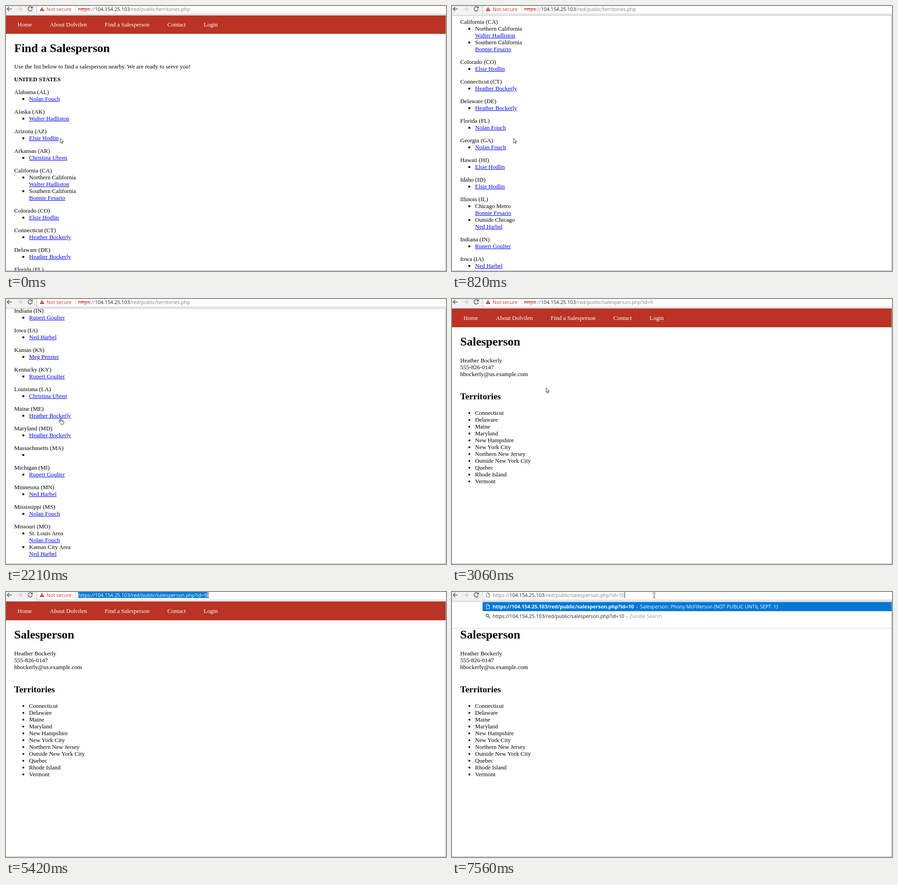
Animation of 964x581 px, one loop 8000 ms. Source, as an HTML page:

```html
<!DOCTYPE html>
<html lang="en">
<head>
<meta charset="utf-8">
<title>Find a Salesperson</title>
<style>
html, body { margin: 0; width: 100%; height: 100%; overflow: hidden; background: #fff; }
body { position: relative; font: 13px/15px "Liberation Serif", serif; color: #000; }
#view { position: absolute; left: 0; top: 21px; width: 963px; height: 559px; overflow: hidden; }
.page { position: absolute; left: 0; top: 0; width: 963px; }
nav { height: 15px; padding: 13px 0 13px 25.3px; background: #ba3324; color: #fff; white-space: nowrap; }
nav span { margin-right: 39px; }
main { padding-left: 18px; }
h1 { font-size: 26px; line-height: 30px; margin: 17.4px 0; }
h2 { font-size: 19.5px; line-height: 22.4px; margin: 16.2px 0; }
p { margin: 0 0 13px; }
ul { margin: 0 0 13px; padding-left: 32.5px; }
.squares ul { list-style: square; }
u { color: #00e; }
svg { position: absolute; left: 0; top: 0; width: 964px; height: 581px; }
svg text { font: 10.8px "Open Sans", sans-serif; white-space: pre; }
svg .b { font-weight: 700; font-size: 11px; }
svg .s { text-decoration: line-through; }
</style>
</head>
<body>
<div id="view"><div class="page squares" id="list"></div><div class="page" id="person"></div></div>
<svg id="chrome"></svg>
<svg id="pointer"></svg>
<script>
const $ = id => document.getElementById(id);

// ---- web pages
const people = {
  N: 'Nolan Fouch', W: 'Walter Hadliston', E: 'Elsie Hodlin', C: 'Christina Ubren', B: 'Bonnie Fesario',
  H: 'Heather Bockerly', D: 'Ned Harbel', R: 'Rupert Goulter', M: 'Meg Penster'
};
const states = `Alabama (AL)=N|Alaska (AK)=W|Arizona (AZ)=E|Arkansas (AR)=C
California (CA)=Northern California:W,Southern California:B|Colorado (CO)=E|Connecticut (CT)=H
Delaware (DE)=H|Florida (FL)=N|Georgia (GA)=N|Hawaii (HI)=E|Idaho (ID)=E
Illinois (IL)=Chicago Metro:B,Outside Chicago:D|Indiana (IN)=R|Iowa (IA)=D|Kansas (KS)=M
Kentucky (KY)=R|Louisiana (LA)=C|Maine (ME)=H|Maryland (MD)=H|Massachusetts (MA)=
Michigan (MI)=R|Minnesota (MN)=D|Mississippi (MS)=N
Missouri (MO)=St. Louis Area:N,Kansas City Area:D`.split(/[|\n]/);

const nav = '<nav>' + ['Home', 'About Dolvilen', 'Find a Salesperson', 'Contact', 'Login']
  .map(s => `<span>${s}</span>`).join('') + '</nav>';

function territory(entry) {
  const [area, key] = entry.includes(':') ? entry.split(':') : ['', entry];
  const link = key ? `<u>${people[key]}</u>` : '&nbsp;';
  return `<li>${area ? area + '<br>' : ''}${link}</li>`;
}

$('list').innerHTML = nav + `<main><h1>Find a Salesperson</h1>
  <p>Use the list below to find a salesperson nearby. We are ready to serve you!</p>
  <p><b>UNITED STATES</b></p>` + states.map(line => {
    const [state, areas] = line.split('=');
    return `<div>${state}<ul>${areas.split(',').map(territory).join('')}</ul></div>`;
  }).join('') + '</main>';

$('person').innerHTML = nav + `<main><h1>Salesperson</h1>
  <div>${people.H}<br>555-826-0147<br>hbockerly@us.example.com<br>&nbsp;</div>
  <h2>Territories</h2><ul>` + ['Connecticut', 'Delaware', 'Maine', 'Maryland', 'New Hampshire', 'New York City',
    'Northern New Jersey', 'Outside New York City', 'Quebec', 'Rhode Island', 'Vermont']
  .map(s => `<li>${s}</li>`).join('') + '</ul></main>';

// ---- browser frame
const HOST = '104.154.25.103', PERSON = '/red/public/salesperson.php?id=', FULL = 'https://' + HOST + PERSON;
const BLUE = '#0078d7', GREY = '#808080', DARK = '#222', RED = '#c53929', LINK = '#1f55c8';

const rect = (x, y, w, h, fill) => `<rect x="${x}" y="${y}" width="${w}" height="${h}" fill="${fill}"/>`;
const path = (d, stroke, width = 1, fill = 'none') =>
  `<path d="${d}" stroke="${stroke}" stroke-width="${width}" fill="${fill}"/>`;
const span = (s, fill, cls = '') => `<tspan fill="${fill}" class="${cls}">${s}</tspan>`;
const text = (x, y, s, fill = DARK, cls = '') => `<text x="${x}" y="${y}" fill="${fill}" class="${cls}">${s}</text>`;
const docIcon = (y, c) => path(`M75.5 ${y - 4.5}h4l2.5 2.5v6.5h-6.5zM79.5 ${y - 4.5}v2.5h2.5`, c);
const lens = y => `<circle cx="77.5" cy="${y - 1}" r="3" fill="none" stroke="#555" stroke-width="1.3"/>` +
  path(`M79.7 ${y + 1.2}l3.6 3.6`, '#555', 1.6);

function bar(loading) {
  return rect(0, 0, 964, 20, '#f2f2f2') + rect(67, 0, 897, 17, '#fff') +
    rect(67, 0, 1, 17, '#b8b8b8') + rect(67, 17, 897, 1, '#c6c6c6') + rect(0, 20, 964, 1, '#b8b8b8') +
    rect(963, 21, 1, 560, '#b0b0b0') + rect(0, 580, 964, 1, '#b0b0b0') +
    path('M12.5 6.5H2.5M7 2L2.5 6.5L7 11', '#555', 1.5) + path('M25 6.5H35M30.5 2L35 6.5L30.5 11', '#ccc', 1.5) +
    (loading ? path('M49 2l8.5 8.5M57.5 2L49 10.5', '#555', 1.6)
      : path('M56.6 3.2A4.7 4.7 0 1 0 57.6 7.5', '#555', 1.5) + path('M58.5 .5V5.2H53.8z', 'none', 0, '#555'));
}

function secureUrl(tail, selected) {
  const c = fill => selected ? '#fff' : fill;
  return path('M79 2L84.2 11H73.8z', 'none', 0, RED) + rect(78.5, 5, 1, 3, '#fff') + rect(78.5, 9, 1, 1, '#fff') +
    text(89, 10.5, 'Not secure', RED) + rect(152, 0, 1, 13, '#ccc') +
    (selected ? rect(158, 0, 283, 13, BLUE) : '') +
    text(158, 10.5, span('https', c(RED), selected ? '' : 's') + span('://', c(GREY)) + span(HOST, c(DARK)) + span(tail, c(GREY)));
}

const editUrl = (id, done) => docIcon(6.5, '#666') + (done ? '' : rect(371.5, 0, 6.5, 13, BLUE)) +
  text(89, 10.5, span('https://', GREY) + span(HOST, DARK) + span(PERSON + id, GREY) + (done ? '' : span('0', '#fff')));

const panel = bottom => rect(0, 21, 963, bottom - 21, '#fff') + rect(0, bottom, 963, 1, '#dcdcdc') +
  rect(0, bottom + 1, 963, 1, '#f3f3f3');
const caret = x => rect(x, 0, 1, 13, '#333');
const hidden = 'Salesperson: Phony McFillerson (NOT PUBLIC UNTIL SEPT. 1)';

function suggestion(y, id, x, title) {
  return docIcon(y, '#666') + text(89, y + 4, FULL, LINK, 'b') + text(386.5, y + 4, id, '#4a78d6') +
    text(x - 8, y + 4, '-', GREY) + text(x, y + 4, title);
}
const search = (y, id, x) => lens(y) + text(89, y + 4, FULL + id) + text(x - 8, y + 4, '-', GREY) +
  text(x, y + 4, 'Zundle Search', '#999');

const allMatches = () => panel(129) + rect(67, 23, 896, 20, BLUE) + docIcon(33, '#fff') +
  text(89, 37, FULL, '#fff', 'b') + suggestion(53, '10', 411, hidden) + search(73, '', 377) +
  suggestion(93.5, '9', 404.5, 'Salesperson: ' + people.H) + suggestion(114, '4', 404.5, 'Salesperson: ' + people.W);

const oneMatch = id => panel(79) + rect(67, 22, 896, 20, BLUE) + docIcon(32, '#fff') +
  text(89, 36, FULL + '10', '#fff', 'b') + text(404, 36, '-', '#fff') + text(412, 36, hidden, '#fff') +
  search(52.5, id, id === '10' ? 389 : 383);

function frame(t) {
  const base = bar(t >= 2510 && t < 2800);
  if (t < 2800) return base + secureUrl('/red/public/territories.php');
  if (t < 6290) return base + secureUrl(PERSON + '9', t >= 5220 && t < 6020) + (t >= 6020 ? caret(440) : '');
  if (t < 7260) return base + editUrl('', true) + allMatches() + (t < 6850 ? caret(366) : '');
  const done = t >= 7560;
  return base + editUrl(done ? '10' : '1', done) + oneMatch(done ? '10' : '1') + (done ? caret(378) : '');
}

// ---- pointer
const arrow = path('M0 0V10.2L2.3 8.2L4 11.8L5.5 11.1L3.9 7.6H7.1Z', '#222', .9, '#fff');
const hand = path('M-1 8V1Q0-.8 1.2 1V5.5L6 6.6Q7.3 7 7 8.6L6 13.5H.2L-3.5 8.6Q-3-.2-1 8M3 6v2M5 6.5v2', '#222', .9, '#fff');
const beam = path('M-2.5-5.5H-.6L0-5L.6-5.5H2.5M0-5V5M-2.5 5.5H-.6L0 5L.6 5.5H2.5', '#333', 1);

// ---- motion
const ticks = [0, 140, 280, 420, 560, 700, 820, 970, 1120, 1250, 1390, 1540, 1680, 1820, 1950, 2080, 2210,
  2800, 2930, 3060, 3200, 3330, 3460, 3590, 3720, 3870, 4010, 4150, 4290, 4430, 4570, 4730, 4880, 5020];
const scrollKeys = [[0, 1.5], [820, 327.5], [1390, 651.5], [1540, 741], [1680, 796], [1820, 814]];
const moveKeys = [[0, 119, 290], [820, 135, 290], [1390, 149, 291], [1820, 149, 291], [2210, 120, 261],
  [2800, 120, 261], [3720, 425, 26], [4150, 414, 22], [4570, 428.5, 19.5], [4730, 434, 18], [4880, 440, 9], [5020, 443, 7.5]];

function at(keys, t, i = 1) {
  const n = keys.findIndex(k => k[0] > t);
  if (n < 0) return keys[keys.length - 1][i];
  const a = keys[n - 1], b = keys[n];
  return a[i] + (b[i] - a[i]) * (t - a[0]) / (b[0] - a[0]);
}

const shown = {};
function put(id, html) {
  if (shown[id] !== html) $(id).innerHTML = shown[id] = html;
}

const start = performance.now();
function draw(now) {
  const t = Math.max(0, now - start) % 8000;
  const q = ticks.filter(k => k <= t).pop();
  $('list').style.top = -at(scrollKeys, q) + 'px';
  $('list').style.display = t < 2800 ? '' : 'none';
  $('person').style.display = t < 2800 ? 'none' : '';
  put('chrome', frame(t));
  const shape = q >= 4880 ? beam : q >= 2080 && t < 2800 ? hand : arrow;
  put('pointer', `<g transform="translate(${at(moveKeys, q)} ${at(moveKeys, q, 2)})">${shape}</g>`);
  requestAnimationFrame(draw);
}
draw(start);
</script>
</body>
</html>
```
